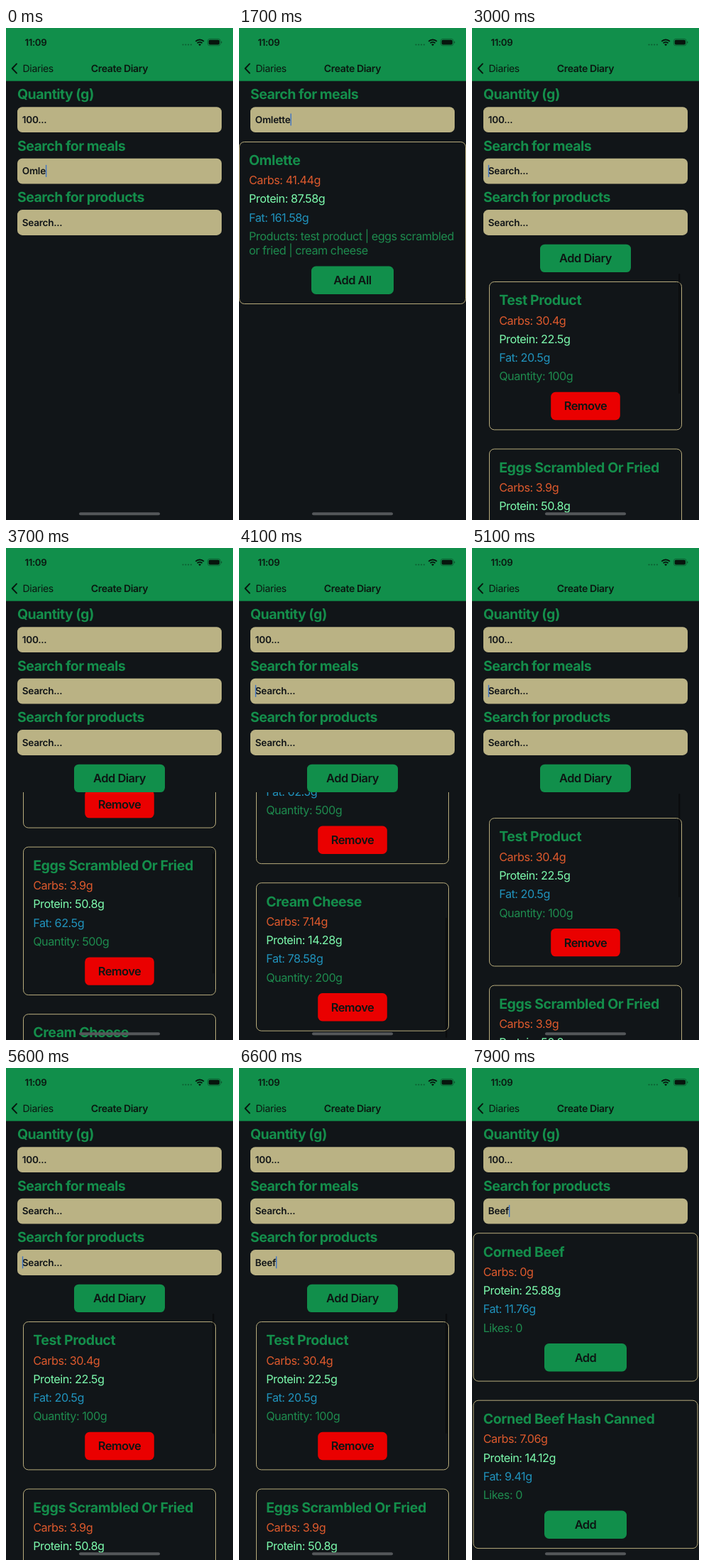
Animation of 320x693 px, one loop 8000 ms. Source, as an HTML page:

```html
<!DOCTYPE html>
<html lang="en">
<head>
<meta charset="utf-8">
<title>Create Diary</title>
<style>
  html, body { margin: 0; width: 100%; height: 100%; overflow: hidden; background: #111518; }
  svg { display: block; width: 320px; height: 693px; font-family: Inter, Roboto, "Liberation Sans", sans-serif; text-rendering: geometricPrecision; }
  .bg { fill: #111518; }
  .green { fill: #118f4b; }
  .box { fill: #bab284; }
  .red { fill: #ea0000; }
  .card { fill: none; stroke: #cbbd87; stroke-width: .9; }
  .head { font-size: 19.5px; font-weight: 700; letter-spacing: -.027em; fill: #148e4b; }
  .name { letter-spacing: -.021em; }
  .row { font-size: 16.2px; letter-spacing: -.029em; }
  .carbs { fill: #de5a2d; }
  .protein { fill: #7dfcae; }
  .fat { fill: #2093bd; }
  .note { fill: #1e8b4e; }
  .label { font-size: 16.4px; font-weight: 600; letter-spacing: -.03em; text-anchor: middle; fill: #0d1513; }
  .input { font-size: 13.5px; font-weight: 600; letter-spacing: -.018em; fill: #101417; }
  .nav { font-size: 14px; letter-spacing: -.025em; fill: #0b1710; }
  .bold { font-weight: 600; }
  .ink { fill: #07150d; }
  .line { fill: none; stroke: #07150d; }
  .caret { fill: #3f74c4; }
  .thumb { fill: #000; opacity: .4; }
</style>
</head>
<body>
<svg id="stage" viewBox="0 0 320 693">
  <defs><clipPath id="listArea"><rect y="344" width="320" height="349"/></clipPath></defs>
  <rect class="bg" width="320" height="693"/>
  <g id="meal"></g>
  <g id="diary">
    <g clip-path="url(#listArea)"><g id="list"></g></g>
    <rect id="thumb" class="thumb" x="291" width="2.5" rx="1.25"/>
    <g id="addDiary"></g>
  </g>
  <g id="products"></g>
  <g id="fields"></g>
  <rect class="green" width="320" height="74.7"/>
  <text class="nav bold" x="26.5" y="25" style="font-size:13.2px">11:09</text>
  <g class="ink" opacity=".4">
    <circle cx="249.5" cy="23.5" r="1.1"/><circle cx="253.3" cy="23.5" r="1.1"/>
    <circle cx="257.1" cy="23.5" r="1.1"/><circle cx="260.9" cy="23.5" r="1.1"/>
  </g>
  <path class="line" stroke-width="1.9" d="M267.3 18.9a8.3 8.3 0 0 1 11.6 0M269.6 21.4a5 5 0 0 1 7 0"/>
  <path class="ink" d="M271.2 23.2a2.8 2.8 0 0 1 3.8 0l-1.9 2z"/>
  <rect class="line" x="284.4" y="15.4" width="17.8" height="9.4" rx="2.8" opacity=".45" stroke-width=".8"/>
  <rect class="ink" x="285.7" y="16.7" width="15.2" height="6.8" rx="1.7"/>
  <path class="ink" opacity=".5" d="M303.2 18.4q1.3 .5 1.3 1.7t-1.3 1.7z"/>
  <path class="line" stroke-width="1.9" stroke-linecap="round" stroke-linejoin="round" d="M15 50.4L8.7 57l6.3 6.6"/>
  <text class="nav" x="23.6" y="62">Diaries</text>
  <text class="nav bold" x="160" y="62" text-anchor="middle">Create Diary</text>
  <rect x="103" y="682.3" width="114" height="4" rx="2" fill="#54575a"/>
</svg>
<script>
const LOOP = 8000, SLOT = 72.4, PITCH = 235.5, LIST_TOP = 357.5, LIST_END = 359;
const RESULTS_IN = 1100, MEAL_ADDED = 2650, PRODUCT_FOCUS = 5500, PRODUCTS_IN = 7300;
const $ = id => document.getElementById(id);

const text = (cls, x, y, s) => `<text class="${cls}" x="${x}" y="${y}">${s}</text>`;
const button = (cls, w, y, s) =>
  `<rect class="${cls}" x="${160 - w / 2}" y="${y}" width="${w}" height="39.4" rx="6.5"/>` +
  text('label', 160, y + 25.6, s);
const frame = (x, y, h) =>
  `<rect class="card" x="${x}" y="${y}" width="${320 - 2 * x}" height="${h}" rx="7"/>`;

function facts(x, y, [name, carbs, protein, fat]) {
  return text('head name', x, y + 32.8, name) +
    text('row carbs', x, y + 60, `Carbs: ${carbs}g`) +
    text('row protein', x, y + 86.3, `Protein: ${protein}g`) +
    text('row fat', x, y + 112.6, `Fat: ${fat}g`);
}

function foodCard(edge, y, food, note, action) {
  return frame(edge, y, 208.4) + facts(edge + 13.7, y, food) +
    text('row note', edge + 13.7, y + 138.9, note) + action(y + 155.3);
}

$('meal').innerHTML = frame(.5, 160.5, 228) +
  facts(14, 160, ['Omlette', 41.44, 87.58, 161.58]) +
  text('row note', 14, 299, 'Products: test product | eggs scrambled') +
  text('row note', 14, 318.5, 'or fried | cream cheese') +
  button('green', 116, 335.5, 'Add All');

$('list').innerHTML = [
  ['Test Product', 30.4, 22.5, 20.5, 100],
  ['Eggs Scrambled Or Fried', 3.9, 50.8, 62.5, 500],
  ['Cream Cheese', 7.14, 14.28, 78.58, 200]
].map((f, i) => foodCard(24.5, LIST_TOP + i * PITCH, f, `Quantity: ${f[4]}g`,
  y => button('red', 97.6, y, 'Remove'))).join('');

$('products').innerHTML = [
  ['Corned Beef', 0, 25.88, 11.76],
  ['Corned Beef Hash Canned', 7.06, 14.12, 9.41]
].map((f, i) => foodCard(2, 232.7 + i * PITCH, f, 'Likes: 0',
  y => button('green', 116, y, 'Add'))).join('');

$('addDiary').innerHTML = button('green', 128, 304.7, 'Add Diary');

$('fields').innerHTML = ['Quantity (g)', 'Search for meals', 'Search for products'].map(title =>
  `<g>${text('head', 16, 100.3, title)}
    <rect class="box" x="16" y="111.3" width="288" height="35.8" rx="7"/>
    ${text('input', 22.8, 134, '')}
    <rect class="caret" x="23" y="120.5" width="1.4" height="17"/></g>`).join('');

const fields = [...$('fields').children].map(g => ({
  g, value: g.querySelector('.input'), caret: g.querySelector('.caret')
}));

const show = (el, on) => el.setAttribute('display', on ? 'inline' : 'none');

// slot < 0 hides the field
function setField({ g, value, caret }, slot, str, hint, focused) {
  show(g, slot >= 0);
  if (slot < 0) return;
  g.setAttribute('transform', `translate(0 ${slot * SLOT})`);
  value.textContent = str || hint;
  show(caret, focused);
  caret.setAttribute('x', 22.8 + (str ? value.getComputedTextLength() : 0));
}

const typed = (word, start, times, t) => word.slice(0, start + times.filter(k => t >= k).length);

const easeIn = u => u * u;
const easeOut = u => u * (2 - u);
const easeBoth = u => u * u * (3 - 2 * u);
const moves = [ // start, end, from, to, ease
  [3250, 3700, 0, 171, easeIn],
  [3700, 4150, 171, LIST_END, easeOut],
  [4600, 5000, LIST_END, -25, easeBoth],
  [5000, 5600, -25, 0, easeBoth]
];
function scrollAt(t) {
  let pos = 0;
  for (const [a, b, from, to, ease] of moves)
    if (t >= a) pos = from + (to - from) * ease(Math.min(1, (t - a) / (b - a)));
  return pos;
}

function caretOn(t) {
  const typing = t < 900 || (t >= PRODUCT_FOCUS && t < 6700);
  return typing || (t - 250) % 1100 >= 300;
}

function render(t) {
  const mealView = t >= RESULTS_IN && t < MEAL_ADDED;
  const productView = t >= PRODUCTS_IN;
  const onProduct = t >= PRODUCT_FOCUS;
  const blink = caretOn(t);
  const meal = t < MEAL_ADDED ? typed('Omlette', 4, [200, 400, 650], t) : '';
  const product = typed('Beef', 0, [5900, 6120, 6300, 6480], t);

  setField(fields[0], mealView ? -1 : 0, '', '100...', false);
  setField(fields[1], mealView ? 0 : productView ? -1 : 1, meal, 'Search...', blink && !onProduct);
  setField(fields[2], mealView ? -1 : productView ? 1 : 2, product, 'Search...', blink && onProduct);

  show($('meal'), mealView);
  show($('products'), productView);
  show($('diary'), t >= MEAL_ADDED && !productView);

  const pos = scrollAt(t);
  $('list').setAttribute('transform', `translate(0 ${-pos})`);
  $('thumb').setAttribute('y', 346 + Math.max(0, pos) * .49);
  $('thumb').setAttribute('height', 169 + Math.min(0, pos));
}

const begin = performance.now();
function tick() {
  render((performance.now() - begin) % LOOP);
  requestAnimationFrame(tick);
}
tick();
</script>
</body>
</html>
```
